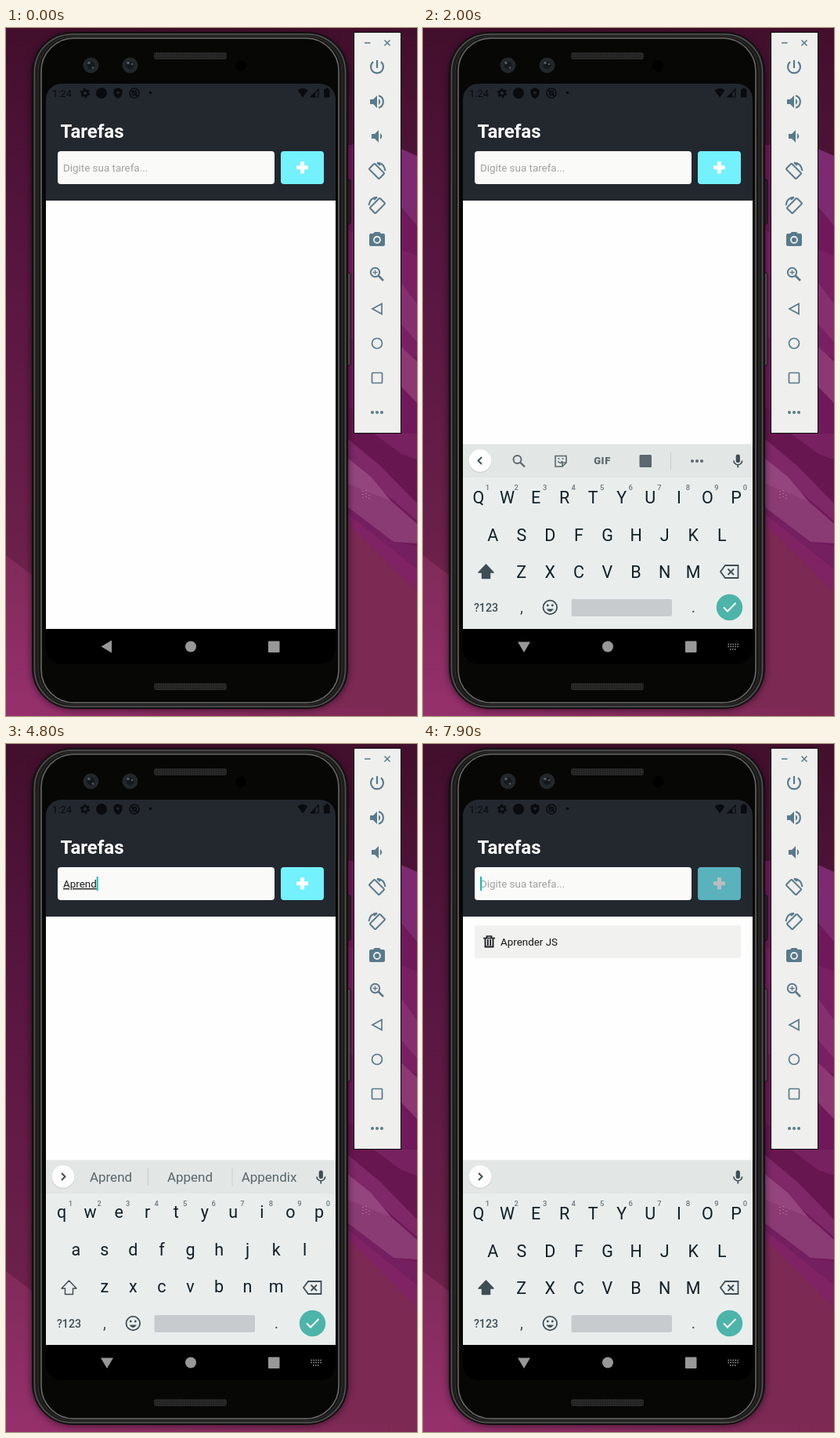
Write an HTML page that moves like this. It is 525x877 px and loops after 8000 ms.

```html
<!DOCTYPE html>
<html lang="pt">
<head>
<meta charset="utf-8">
<title>Tarefas</title>
<style>
  html, body { margin: 0; width: 100%; height: 100%; overflow: hidden; background: #5c1a45; }
  svg { display: block; width: 100%; height: 100%; }
  text { font-family: Roboto, "Noto Sans", sans-serif; white-space: pre; }
  .mid { text-anchor: middle; }
  .line { fill: none; stroke: currentColor; }
  .fill { fill: currentColor; }
  .field { font-size: 13.4px; }
  .panel { color: #587a8b; }
  .status { color: #090b0e; }
  .keys { color: #3f4d54; }
  .letter { font-size: 21.5px; fill: #101f26; }
  .digit { font-size: 9.4px; font-weight: 500; fill: #6c777b; }
  .word { font-size: 17px; fill: #5a666a; }
  .under { text-decoration: underline; }
</style>
</head>
<body>
<svg viewBox="0 0 525 877" preserveAspectRatio="none">
  <defs>
    <linearGradient id="wall" x2="0" y2="1">
      <stop offset="0" stop-color="#420f2c"/><stop offset=".35" stop-color="#571640"/>
      <stop offset=".75" stop-color="#6a2049"/><stop offset="1" stop-color="#7f2a57"/>
    </linearGradient>
    <linearGradient id="glow" x2="0" y2="1">
      <stop offset="0" stop-color="#7f2b59"/><stop offset="1" stop-color="#96306c"/>
    </linearGradient>
    <linearGradient id="floor">
      <stop offset="0" stop-color="#96306c"/><stop offset="1" stop-color="#7c2953"/>
    </linearGradient>
    <pattern id="mesh" width="3" height="3" patternUnits="userSpaceOnUse">
      <rect width="3" height="3" fill="#292929"/><circle cx="1.5" cy="1.5" r=".8" fill="#161616"/>
    </pattern>
    <filter id="soft" x="-10%" y="-10%" width="120%" height="120%"><feGaussianBlur stdDeviation="5"/></filter>
    <clipPath id="screen"><rect x="51" y="71" width="370" height="740" rx="20"/></clipPath>
  </defs>

  <!-- wallpaper -->
  <rect width="525" height="877" fill="url(#wall)"/>
  <path d="M0 672 60 718V877H0z" fill="url(#glow)"/>
  <rect y="860" width="525" height="17" fill="url(#floor)"/>
  <path d="M420 150Q480 145 525 166V718L420 614z" fill="#70195a"/>
  <path d="M500 152 525 163V252L500 222z" fill="#7c2b70"/>
  <path d="M420 252 525 290V420L420 390z" fill="#792063"/>
  <path d="M500 318 525 352V400L500 372z" fill="#862f6e"/>
  <path d="M500 402 525 425V478L500 452z" fill="#8b3873"/>
  <path d="M420 470 525 548V612L420 520z" fill="#68164f"/>
  <path d="M470 517H525V550L505 543z" fill="#782161"/>
  <path d="M420 510 478 558 525 606V628L490 598 420 540z" fill="#7e2867"/>
  <path d="M420 535 466 572 492 603 420 580z" fill="#95457d"/>
  <path d="M420 574 492 603 525 632V657L495 655 420 600z" fill="#8b3b74"/>
  <path d="M420 598 495 655 525 660V692L420 608z" fill="#741f5f"/>
  <path d="M420 606 525 690V718L420 616z" fill="#7f2364"/>
  <path d="M420 614 525 718V867H420z" fill="#7c2954"/>
  <path d="M456 590v10M460 589v12M464 595v8" stroke="#c993b5" stroke-dasharray="1 3"/>

  <!-- phone body -->
  <rect x="33" y="8" width="404" height="861" rx="52" opacity=".55" filter="url(#soft)"/>
  <rect x="434" y="193" width="6" height="57" rx="2" fill="#24201f" stroke="#111"/>
  <rect x="434" y="312" width="6" height="118" rx="2" fill="#4c4849" stroke="#151313"/>
  <rect x="33.500" y="5.500" width="403" height="862" rx="51" fill="#1a1918" stroke="#0d0c0c"/>
  <rect x="36.500" y="8" width="397" height="857" rx="48" fill="#1c1c1b" stroke="#555" stroke-width="1.500"/>
  <rect x="41" y="10.500" width="388" height="852" rx="45" fill="#151514" stroke="#333"/>
  <rect x="45" y="13" width="380" height="847" rx="42" fill="#070706" stroke="#6c6c6c" stroke-width="1.500"/>
  <rect x="189" y="31" width="93" height="9" rx="3" fill="url(#mesh)"/>
  <rect x="189" y="835" width="93" height="9" rx="3" fill="url(#mesh)"/>
  <g fill="#22272a">
    <circle cx="108.500" cy="47.500" r="10"/><circle cx="158.500" cy="47.500" r="10"/>
  </g>
  <g fill="#15191c">
    <circle cx="108.500" cy="47.500" r="5"/><circle cx="158.500" cy="47.500" r="5"/>
  </g>
  <g fill="#525a5e">
    <circle cx="106" cy="44.500" r="1.800"/><circle cx="111" cy="50.500" r="1.300"/>
    <circle cx="156" cy="44.500" r="1.800"/><circle cx="161" cy="46" r="1.300"/>
  </g>
  <circle cx="300" cy="48" r="7" fill="#000"/>

  <g clip-path="url(#screen)">
    <rect x="51" y="71" width="370" height="149" fill="#23272e"/>
    <rect x="51" y="220" width="370" height="546" fill="#fefefe"/>

    <g class="status">
      <text x="59" y="87.500" font-size="13" class="fill">1:24</text>
      <circle cx="101" cy="83" r="3.500" class="line" stroke-width="2.400"/>
      <circle cx="101" cy="83" r="5.300" class="line" stroke-width="1.800" stroke-dasharray="2.800 2.750"/>
      <circle cx="122" cy="83" r="7" class="fill"/>
      <path d="M143 76 148.500 78.500V83Q148 88 143 90 138 88 137.500 83V78.500z" class="fill"/>
      <circle cx="143" cy="82.500" r="1.800" fill="#23272e"/>
      <g class="line" stroke-width="1.500">
        <circle cx="164" cy="83" r="6"/><circle cx="164" cy="83" r="2.700"/><path d="M160 79 168.500 87.500"/>
      </g>
      <circle cx="184.500" cy="82.500" r="1.800" class="fill"/>
      <path d="M372.500 79.500Q379 74 385.500 79.500L379 88.500zM406 78h2v-1.500h4V78h1.500V88.500H406z" class="fill"/>
      <path d="M389 88 399 78V88z" class="line" stroke-width="1.200"/>
      <path d="M389 88 395 82V88z" class="fill"/>
    </g>

    <text x="69.500" y="140.300" font-size="24" font-weight="700" fill="#fff" id="title">Tarefas</text>
    <rect x="66" y="157" width="277" height="42" rx="4" fill="#fafaf9"/>
    <text id="hint" class="field" x="73" y="183" fill="#a0a0a0">Digite sua tarefa...</text>
    <text class="field" x="73" y="183" fill="#1c1c1c"><tspan id="done"></tspan><tspan id="draft" class="under"></tspan></text>
    <rect id="caret" y="169" width="2" height="18" fill="#14bfae"/>

    <g id="add">
      <rect x="351" y="157" width="55" height="42" rx="4" fill="#73f1fd"/>
      <g fill="#fff">
        <rect x="376" y="170" width="5" height="15.500" rx="1.200"/>
        <rect x="371" y="175.300" width="15" height="5" rx="1.200"/>
      </g>
    </g>

    <g id="item">
      <rect x="66" y="231" width="340" height="42" rx="3" fill="#f1f1f0"/>
      <g fill="none" stroke="#17191d">
        <path d="M77 247.500H92M81.500 247V245H87.500V247" stroke-width="1.700"/>
        <path d="M79.500 248V258.500H89.500V248M82.800 249v8M86.200 249v8" stroke-width="1.800"/>
      </g>
      <text class="field" x="99" y="257" fill="#151515">Aprender JS</text>
    </g>

    <rect x="51" y="766" width="370" height="45" fill="#000"/>
    <g fill="#989898">
      <path id="back" d="M121.500 788.500 135 780.500V796.500z"/>
      <circle cx="236" cy="788.500" r="7"/>
      <rect x="335" y="781.500" width="14.500" height="14.500" rx="1"/>
    </g>
    <path id="switcher" d="M389.500 785.500H403M389.500 788.500H403M392 792H400.500" stroke="#a2a2a2" stroke-width="1.600" stroke-dasharray="1.500 1.450"/>

    <g id="keyboard" class="keys">
      <rect x="51" y="530.500" width="370" height="235.500" fill="#e9eeed"/>
      <rect x="51" y="530.500" width="370" height="42.500" fill="#e2e7e5"/>
      <circle cx="73" cy="552.500" r="14.500" fill="#cbd0cf"/>
      <circle cx="73" cy="551.500" r="14.300" fill="#fff"/>
      <path id="chevron" d="M71 547 75.500 551.500 71 556" class="line" stroke-width="1.900"/>

      <g id="tools" color="#5b686d">
        <circle cx="120.500" cy="550" r="5" class="line" stroke-width="2"/>
        <path d="M124 553.500 130 559.500" class="line" stroke-width="2.300"/>
        <path d="M169 545.500H183V554L178 559H169zM178 559V554H183M172.500 552Q175 557 178 552M172.500 549h2M177.500 549h2" class="line" stroke-width="1.600"/>
        <text x="229" y="556" class="mid fill" font-size="13" font-weight="900" letter-spacing=".6">GIF</text>
        <rect x="276.500" y="544" width="15.500" height="16" rx="1.500" class="fill"/>
        <path d="M316.500 541V563" stroke="#c9cecd"/>
        <g class="fill"><circle cx="344" cy="552" r="2"/><circle cx="350" cy="552" r="2"/><circle cx="356" cy="552" r="2"/></g>
      </g>
      <g id="words">
        <path d="M181.500 540V563M289 540V563" stroke="#c9cecd"/>
        <text class="word mid" x="134" y="558"></text>
        <text class="word mid" x="235" y="558"></text>
        <text class="word mid" x="336" y="558"></text>
      </g>
      <rect x="399.700" y="543.500" width="5.200" height="10.500" rx="2.600" class="fill"/>
      <path d="M397 551.500a5.300 5.300 0 0 0 10.600 0M402.300 557v3.500" class="line" stroke-width="1.700"/>

      <g id="letters"></g>
      <path id="shift" d="M80.500 684 71 694H75.500V701.500H85.500V694H90z" stroke="currentColor" stroke-width="1.500" stroke-linejoin="round"/>
      <path d="M386 685H402.500V701H386L380 693zM389.500 689.500 397 697M397 689.500 389.500 697" class="line" stroke-width="1.800"/>
      <text x="80.500" y="744" class="mid fill" font-size="14.200" font-weight="500">?123</text>
      <text x="126" y="745" class="mid fill" font-size="20">,</text>
      <text x="345.500" y="745" class="mid fill" font-size="20">.</text>
      <circle cx="162.300" cy="738.500" r="8.800" class="line" stroke-width="1.800"/>
      <path d="M157.500 740.500Q162.300 747.500 167 740.500z" class="fill"/>
      <circle cx="159.300" cy="736" r="1.400" class="fill"/><circle cx="165.300" cy="736" r="1.400" class="fill"/>
      <rect x="189.500" y="728" width="128.500" height="22" rx="2" fill="#c7cbce"/>
      <circle cx="391.500" cy="738.500" r="16.700" fill="#4db4a9"/>
      <path d="M384 738.500 389 743.500 399.500 733" fill="none" stroke="#fff" stroke-width="2"/>
    </g>
  </g>

  <!-- emulator controls -->
  <g class="panel">
    <rect x="444.500" y="5.500" width="60" height="511" fill="#efefed" stroke="#080608"/>
    <path d="M458 19H465.500M483.500 15.500 490.500 22.500M490.500 15.500 483.500 22.500" class="line" stroke-width="1.500"/>
    <path d="M474 41V51M469 43.200A8 8 0 1 0 479 43.200" class="line" stroke-width="2.200"/>
    <path d="M465 91h4l5-5v16l-5-5h-4z" class="fill"/>
    <path d="M476 90Q480.500 94 476 98z" class="fill"/>
    <path d="M476 86.300A8 8 0 0 1 476 101.700" class="line" stroke-width="2.100"/>
    <path d="M467 135h4l5-5v16l-5-5h-4zM478 134Q482.500 138 478 142z" class="fill"/>
    <g id="turn" class="line" stroke-width="2">
      <rect x="-5" y="-9" width="10" height="18" rx="1" transform="translate(-.5 .5) rotate(-45)"/>
      <path d="M0 -10.300Q9 -10 10.500 0M0 -10.300 4 -7"/>
    </g>
    <path d="M464 264q0-2 2-2h3l2-2h6l2 2h3q2 0 2 2v12q0 2-2 2h-16q-2 0-2-2z" class="fill"/>
    <circle cx="474" cy="270" r="4" fill="none" stroke="#efefed" stroke-width="1.800"/>
    <circle cx="471.500" cy="311.500" r="5.700" class="line" stroke-width="1.900"/>
    <path d="M475.500 315.500 482 322" class="line" stroke-width="2.600"/>
    <path d="M468.500 311.500h6M471.500 308.500v6" class="line" stroke-width="1.300"/>
    <g class="line" stroke-width="1.700">
      <path d="M468 358 480 351.500V364.500z"/><circle cx="474" cy="402" r="6.500"/>
      <rect x="467.500" y="439.500" width="13" height="13" rx="1"/>
    </g>
    <g class="fill"><circle cx="468" cy="490" r="2"/><circle cx="474" cy="490" r="2"/><circle cx="480" cy="490" r="2"/></g>
  </g>
</svg>
<script>
const LOOP = 8000;
const $ = id => document.getElementById(id);
const show = (el, on) => el.setAttribute('visibility', on ? 'inherit' : 'hidden');

function svg(name, attrs, parent, text = '') {
  const el = document.createElementNS('http://www.w3.org/2000/svg', name);
  for (const key in attrs) el.setAttribute(key, attrs[key]);
  el.textContent = text;
  return parent.appendChild(el);
}

// Both rotate buttons share one drawing, the second mirrored.
const turn = $('turn');
const mirror = turn.cloneNode(true);
turn.setAttribute('transform', 'translate(474 182)');
mirror.removeAttribute('id');
mirror.setAttribute('transform', 'translate(474 226) scale(-1 1)');
turn.after(mirror);

const letters = [];
[['QWERTYUIOP', 71, 606], ['ASDFGHJKL', 89.3, 653.5], ['ZXCVBNM', 125.8, 701]].forEach(([row, left, y], r) => {
  [...row].forEach((char, i) => {
    const x = left + i * 36.55;
    letters.push({ char, y, el: svg('text', { x, class: 'letter mid' }, $('letters')) });
    if (r === 0) svg('text', { x: x + 11.5, y: 588.5, class: 'digit mid' }, $('letters'), (i + 1) % 10);
  });
});

const start = {
  caret: false, done: '', draft: '', slide: null, fade: 1, turn: 0,
  caps: true, tools: true, words: null, add: 1, item: false
};

// Each step overrides part of the state before it.
const steps = [
  [1600, { caret: true }],
  [1700, { slide: 17, fade: .69, turn: -78 }],
  [1800, { slide: 6, fade: .9, turn: -88 }],
  [1900, { slide: 2, fade: .98, turn: -90 }],
  [2000, { slide: 0, fade: 1, caret: false }],
  [2600, { caret: true }],
  [3100, { caret: false }],
  [3600, { caret: true }],
  [3700, { draft: 'A', caps: false, tools: false, words: ['A', 'And', 'As'] }],
  [3900, { draft: 'Ap' }],
  [4000, { words: ['Ap', 'App', 'Application'] }],
  [4100, { draft: 'Apr' }],
  [4200, { words: ['Apr', 'April', 'Apron'] }],
  [4300, { draft: 'Apre', words: ['Apre', 'Apres', 'Spree'] }],
  [4600, { draft: 'Apren' }],
  [4700, { words: ['Apren', 'Apron', 'Apprentice'] }],
  [4800, { draft: 'Aprend', words: ['Aprend', 'Append', 'Appendix'] }],
  [4900, { draft: 'Aprende' }],
  [5000, { words: ['Aprende', 'Append', ''] }],
  [5100, { draft: 'Aprender', words: ['', 'Aprender', ''] }],
  [5600, { caret: false }],
  [5800, { caret: true, done: 'Aprender ', draft: '', words: ['is', 'and', 'the'] }],
  [6300, { draft: 'J' }],
  [6400, { draft: 'JS', words: ['JS', "J'S", 'JUST'] }],
  [6800, { caret: false }],
  [7300, { caret: true }],
  [7500, { add: .69 }],
  [7800, { done: '', draft: '', item: true }],
  [7900, { caps: true, words: null }]
];

const states = [[0, start]];
for (const [time, change] of steps) states.push([time, { ...states.at(-1)[1], ...change }]);

function render(s) {
  $('done').textContent = s.done;
  $('draft').textContent = s.draft;
  show($('hint'), !(s.done + s.draft));
  const width = s.done || s.draft ? $('done').parentNode.getComputedTextLength() : 0;
  $('caret').setAttribute('x', 73 + width);
  show($('caret'), s.caret);

  $('add').setAttribute('opacity', s.add);
  show($('item'), s.item);

  const open = s.slide !== null;
  show($('keyboard'), open);
  show($('switcher'), open);
  $('keyboard').setAttribute('transform', `translate(0 ${s.slide || 0})`);
  $('keyboard').setAttribute('opacity', s.fade);
  $('back').setAttribute('transform', `rotate(${s.turn} 129 788.5)`);

  show($('tools'), s.tools);
  $('chevron').setAttribute('transform', s.tools ? 'translate(146 0) scale(-1 1)' : '');
  show($('words'), s.words);
  $('words').querySelectorAll('text').forEach((el, i) => { el.textContent = s.words ? s.words[i] : ''; });

  $('shift').setAttribute('fill', s.caps ? 'currentColor' : 'none');
  for (const { char, y, el } of letters) {
    el.textContent = s.caps ? char : char.toLowerCase();
    el.setAttribute('y', s.caps ? y : y - 2);
  }
}

let current;
function frame() {
  const t = performance.now() % LOOP;
  const state = states.findLast(([time]) => time <= t)[1];
  if (state !== current) render(current = state);
  requestAnimationFrame(frame);
}
frame();
</script>
</body>
</html>
```
